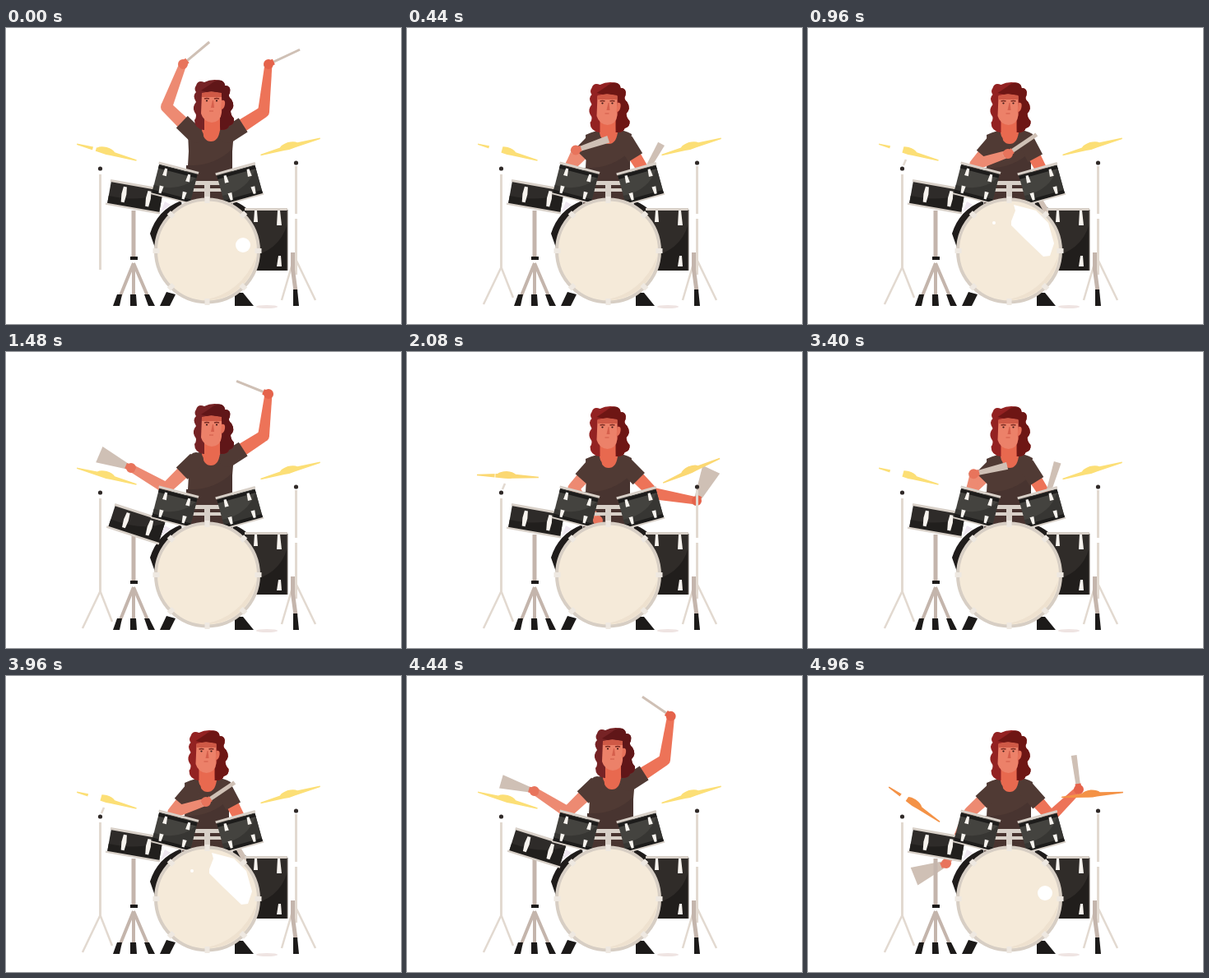
These frames come from a looping animation (480x360 px, 5000 ms). An HTML page:

```html
<!DOCTYPE html>
<html lang="en">
<head>
<meta charset="utf-8">
<title>Drummer</title>
<style>
html, body { margin: 0; width: 100%; height: 100%; overflow: hidden; background: #fff; }
svg { display: block; width: 480px; height: 360px; }
.metal { stroke: #e2d9d0; fill: none; }
.grey { stroke: #c4b5ac; fill: none; }
.black { fill: #1c1a19; }
.chrome { fill: #d8d0c8; }
.lug { fill: #f7f3ee; }
</style>
</head>
<body>
<svg viewBox="0 0 480 360">
  <defs>
    <g id="tom">
      <rect x="-24" y="-18" width="48" height="37" fill="#44433f"/>
      <path d="M-24 8Q8 10 24-14V19H-24Z" fill="#373633"/>
      <path d="M-24-15H24M-24 16H24" stroke="#1d1c1b" stroke-width="4"/>
      <path class="chrome" d="M-25-21H25V-18H-25ZM-25 18H25V20H-25Z"/>
      <path class="lug" d="M-16-15h3l1 9h-5ZM13-15h3l1 9h-5ZM-16 16h3l1-9h-5ZM13 16h3l1-9h-5Z"/>
    </g>
    <path id="cymbal" d="M-37-.4L-12-2Q-9-5-1-5.500Q7-5 10-2L38 0V1.500L6 3Q0 4-8 3L-37 1Z"/>
  </defs>

  <ellipse cx="317" cy="339" rx="13" ry="2" fill="#efe4e2"/>
  <path d="M213 210Q184 221 175 250L182 270H220ZM276 210Q300 219 312 246L306 270H270Z" fill="#1f1c1b"/>
  <path d="M200 215L188 224L193 211Z" fill="#eee7f0"/>

  <g id="torso">
    <path d="M239 121Q230 123 221 127L222 150L218 220H275V150L277 126Q268 121 260 121Z" fill="#503a34"/>
    <path d="M219 167Q252 169 275 147V220H218Z" fill="#483430"/>
    <path d="M238 112H260V124Q258 138 249 138Q240 138 238 124Z" fill="#e8694f"/>
  </g>
  <g id="arms"></g>

  <g id="head">
    <path id="hair" d="M231 70Q233 63 241 66Q250 61 262 64Q266 66 266 70Q274 70 272 79Q269 83 274 87Q279 95 273 101Q273 106 277 110Q278 117 271 119Q270 124 262 124H240Q229 122 229 112Q233 107 229 102Q226 96 231 90Q226 82 231 78Q228 74 231 70Z"/>
    <path id="lock" d="M249 68Q256 62 262 64Q266 66 266 70Q274 70 272 79Q269 83 274 87Q279 95 273 101Q273 106 277 110Q278 117 271 119Q270 124 261 124Q258 114 262 104Q267 92 260 79Q249 80 237 76Z"/>
    <path d="M241 108H260V125H241Z" fill="#e8694f"/>
    <path d="M238 80Q249 75 262 80V103Q261 114 250 115Q240 114 237 104Z" fill="#ec8169"/>
    <path d="M262 88q5-1 4 5q-1 6-5 6Z" fill="#e6715a"/>
    <path d="M238 79Q249 76 262 79V84H238Z" fill="#cf5946"/>
    <path d="M251 88L249 97H253L252 88Z" fill="#d55f4c"/>
    <path d="M241 86q3-1 6 0M253 86q3-1 6 0" stroke="#7a2a22" stroke-width="1.500" fill="none"/>
    <circle cx="244" cy="88.500" r="1.100" fill="#3d1a18"/><circle cx="256" cy="88.500" r="1.100" fill="#3d1a18"/>
    <path d="M247 101h5" stroke="#d05a49"/>
  </g>

  <g class="metal" stroke-width="3">
    <path d="M114.500 178V294M352.500 168V226M352.500 232V300"/>
    <path id="legs" d="M114.500 291L93 336M114.500 291L129 328" stroke-width="2.500"/>
    <path d="M349 283L335 331M351 279L376 331" stroke-width="2.500"/>
    <path id="pin" d="M116 167L119 160" stroke-width="2.500"/>
  </g>
  <circle cx="114.500" cy="171" r="2.600" fill="#302a28"/>
  <circle cx="352.500" cy="164" r="2.600" fill="#302a28"/>
  <g id="left"><use href="#cymbal"/><rect y="-8" height="16" fill="#fff"/></g>
  <g id="right"><use href="#cymbal"/></g>

  <rect x="292" y="221" width="50" height="74" fill="#302c29"/>
  <path d="M292 279Q332 273 342 238V295H292Z" fill="#211e1c"/>
  <path class="chrome" d="M290 219H342V222H290Z"/>
  <path d="M342 221V295" stroke="#6e6660"/>
  <path class="lug" d="M330 222h3l2 18h-6ZM331 277h3l1 13h-6ZM302 222h3l1 14h-5Z"/>
  <path class="grey" d="M348.500 273V294L352 320" stroke-width="5"/>
  <path class="black" d="M349 318h5l2 20h-7Z"/>

  <path class="grey" d="M155 222V279" stroke-width="5"/>
  <path class="grey" d="M155 286L138 328M155 286V328M155 286L173 328" stroke-width="4"/>
  <path class="black" d="M135 324h6l-3 14h-8ZM151 324h7l1 14h-8ZM168 324h6l7 14h-8ZM151 278h9v4h-9Z"/>
  <g id="snare">
    <rect x="-32" y="-14" width="64" height="28" fill="#2e2b29"/>
    <path d="M-32 4Q10 6 32-12V14H-32Z" fill="#211f1d"/>
    <path class="chrome" d="M-33-16H33V-13H-33ZM-34 13H33V15.500H-34Z"/>
    <path class="lug" d="M-16-10h4l1 9l-1 10h-4l-1-10ZM14-10h4l1 9l-1 10h-4l-1-10Z"/>
  </g>

  <path class="chrome" d="M226 186H263V191H226ZM226 195H263V199H226ZM241 187H248V210H241Z"/>
  <use href="#tom" transform="translate(205 189) rotate(14.500)"/>
  <use href="#tom" transform="translate(284 190) rotate(-15.500)"/>

  <path class="black" d="M195 321L206 324L199 338H187ZM278 322H288L301 338H278Z"/>
  <circle cx="244.500" cy="271" r="62.500" fill="#f5ead9" stroke="#d7cec4" stroke-width="4"/>
  <path d="M304 278A60 60 0 0 1 240 331Q286 323 304 278Z" fill="#eee1cf"/>
  <g id="lugs"></g>
  <circle id="spot" cx="288" cy="264" r="9" fill="#fff"/>
  <g id="glare" fill="#fff">
    <path d="M247 235L252 222L250 215L277 222L292 237L299 262L294 277L286 278L264 257L247 240Z"/>
    <circle cx="226" cy="237" r="2"/>
  </g>
</svg>
<script>
const LOOP = 5000, PHRASE = 3000, STEP = 40, STICK = 42, CRASH = 1960;
const $ = id => document.getElementById(id);
const svgEl = (parent, tag, attrs) => {
  const el = document.createElementNS("http://www.w3.org/2000/svg", tag);
  for (const k in attrs) el.setAttribute(k, attrs[k]);
  return parent.appendChild(el);
};

const mix = (a, b, k) => a + (b - a) * k;
const tint = (a, b, k) => `rgb(${a.map((v, i) => Math.round(mix(v, b[i], k)))})`;
const smooth = (a, b, v) => {
  const u = Math.min(1, Math.max(0, (v - a) / (b - a)));
  return u * u * (3 - 2 * u);
};
// Rises from a to b, falls from c to d
const pulse = (t, a, b, c, d) => smooth(a, b, t) - smooth(c, d, t);
const bump = (t, peak) => Math.exp(-(((t - peak) / 80) ** 2));
const fade = (t, start, tau) => t < start ? 0 : Math.exp((start - t) / tau);

// Each pose: time, hand x y, stick angle. The stick gains `turn` degrees per phrase.
const leftArm = {
  shoulder: 231, skin: "#ed8a72", hand: "#e8745c", turn: 360, swing: 1, blurs: [1480, CRASH],
  poses: [
    [0, 215, 44, -40], [200, 190, 150, 30], [960, 243, 153, -34],
    [1480, 152, 141, 203], [CRASH, 168, 228, 158], [2080, 232, 205, 90],
    [2450, 205, 46, 270], [2920, 237, 40, 362]
  ],
  elbow: (x, y, up) => [mix(195 + (x - 152) * .09, 195 + (x - 215) * .5, up), mix(166, 96, up)]
};
const rightArm = {
  shoulder: 268, skin: "#ed7358", hand: "#e5634b", turn: 0, swing: -1, blurs: [1080, 2080],
  poses: [
    [0, 319, 44, -25], [200, 300, 150, -140], [960, 272, 192, 60],
    [1080, 372, 140, -30], [1340, 330, 52, -90], [1480, 319, 51, -158],
    [CRASH, 329, 138, -98], [2080, 352, 181, -65], [2400, 322, 42, -85]
  ],
  elbow: (x, y, up) => [mix(291 + (x - 310) * .2, 313, up), mix(172, 102, up)]
};

// Smooth cyclic curve through the poses
function poseAt({ poses, turn }, t) {
  const n = poses.length;
  const key = i => {
    const lap = Math.floor(i / n), [time, x, y, a] = poses[i - lap * n];
    return [time + lap * PHRASE, x, y, a + lap * turn];
  };
  let i = 0;
  while (key(i + 1)[0] <= t) i++;
  const [p, a, b, q] = [key(i - 1), key(i), key(i + 1), key(i + 2)];
  const span = b[0] - a[0], u = (t - a[0]) / span, ease = smooth(0, 1, u);
  return [1, 2, 3].map(j => {
    const va = .5 * span * (b[j] - p[j]) / (b[0] - p[0]);
    const vb = .5 * span * (q[j] - a[j]) / (q[0] - a[0]);
    return mix(a[j], b[j], ease) + u * (1 - u) * ((1 - u) * va - u * vb);
  });
}

// Tapered bar between two points
function bar([ax, ay], [bx, by], wa, wb) {
  const len = Math.hypot(bx - ax, by - ay) || 1;
  const nx = (ay - by) / len / 2, ny = (bx - ax) / len / 2;
  return `M${ax + nx * wa} ${ay + ny * wa}L${bx + nx * wb} ${by + ny * wb}` +
    `L${bx - nx * wb} ${by - ny * wb}L${ax - nx * wa} ${ay - ny * wa}Z`;
}
const disc = ([x, y], r) => `M${x - r} ${y}a${r} ${r} 0 1 0 ${2 * r} 0a${r} ${r} 0 1 0 ${-2 * r} 0Z`;

function makeArm(arm) {
  const part = fill => svgEl($("arms"), "path", { fill });
  const upper = part(arm.skin), sleeve = part("#503a34"), fore = part(arm.skin);
  const stick = part("#cfc0b5"), hand = part(arm.hand);
  return (t, down) => {
    let [x, y, deg] = poseAt(arm, t);
    const rolling = pulse(t, 160, 300, 720, 900);
    const beat = arm.swing * rolling * Math.sin(t * Math.PI / 120);
    y += 10 * beat;
    deg += 35 * beat;
    const blur = 4 * rolling + 18 * arm.blurs.reduce((sum, peak) => sum + bump(t, peak), 0);

    const s = [arm.shoulder - 3 * down, 131 + 6 * down], h = [x, y];
    const e = arm.elbow(x, y, smooth(145, 48, y));
    const c = Math.cos(deg * Math.PI / 180), n = Math.sin(deg * Math.PI / 180);
    const along = d => [x + c * d, y + n * d];
    const k = 24 / Math.hypot(e[0] - s[0], e[1] - s[1]);
    const cuff = [mix(s[0], e[0], k), mix(s[1], e[1], k)];
    const width = 3 + 2 * down;
    upper.setAttribute("d", bar(s, e, 17, 14) + disc(e, 7));
    sleeve.setAttribute("d", bar(s, cuff, 20, 20) + disc(s, 9));
    fore.setAttribute("d", bar(e, h, 14, 9));
    stick.setAttribute("d", bar(along(-6), along(STICK), width, width + blur));
    hand.setAttribute("d", disc(h, 6) + bar(along(-4), along(7), 8, 7));
  };
}
const arms = [rightArm, leftArm].map(makeArm);

for (let i = 0; i < 8; i++) {
  svgEl($("lugs"), "rect", {
    x: -3, y: -66, width: 6, height: 8, fill: "#eee8e1",
    transform: `translate(244.5 271) rotate(${i * 45})`
  });
}

const place = (id, x, y, deg = 0) =>
  $(id).setAttribute("transform", `translate(${x} ${y}) rotate(${deg})`);
const paint = (id, color) => $(id).setAttribute("fill", color);
const show = (id, on) => $(id).setAttribute("visibility", on ? "visible" : "hidden");

function draw(time) {
  const t = time % PHRASE;
  const down = pulse(t, 0, 200, 1040, 1320) + pulse(t, 1520, 1760, 2120, 2400);
  arms.forEach(arm => arm(t, down));
  place("torso", -4 * down, 3 * down);
  place("head", -6.5 * down, 3 * down);
  paint("hair", tint([118, 35, 37], [147, 34, 34], down));
  paint("lock", tint([96, 22, 24], [110, 22, 20], down));

  const wobble = fade(t, CRASH, 315) * Math.cos((t - CRASH) * Math.PI / 120);
  const glow = fade(t, CRASH, 50) + .7 * fade(t, 2880, 80);
  const color = tint([252, 223, 118], [244, 146, 70], glow);
  const kick = Math.max(0, wobble);
  place("left", 122 + 7 * kick, 150.500 + 5 * kick, 15 + 19 * wobble);
  place("right", 345, 144, -16 + 11 * wobble);
  paint("left", color);
  paint("right", color);
  const gap = t < 1200 ? 4 + 12 * down : 9 * glow;
  const cut = $("left").lastElementChild;
  cut.setAttribute("x", -15 - gap / 2);
  cut.setAttribute("width", gap);

  const tilt = pulse(t, 1240, 1480, 1480, 1720);
  place("snare", 157 + 2 * tilt, 205.500 + 4 * tilt, 10 + 8 * tilt);

  const raised = t < 400 || t >= 2600;
  const reaching = t >= 600 && t < 1200;
  show("legs", !raised);
  show("pin", reaching || (t > CRASH && t < 2400));
  show("spot", raised || Math.abs(t - CRASH) < 80);
  show("glare", reaching);
}

function frame() {
  const t = performance.now() % LOOP;
  draw(Math.floor(t / STEP) * STEP);
  requestAnimationFrame(frame);
}
frame();
</script>
</body>
</html>
```
